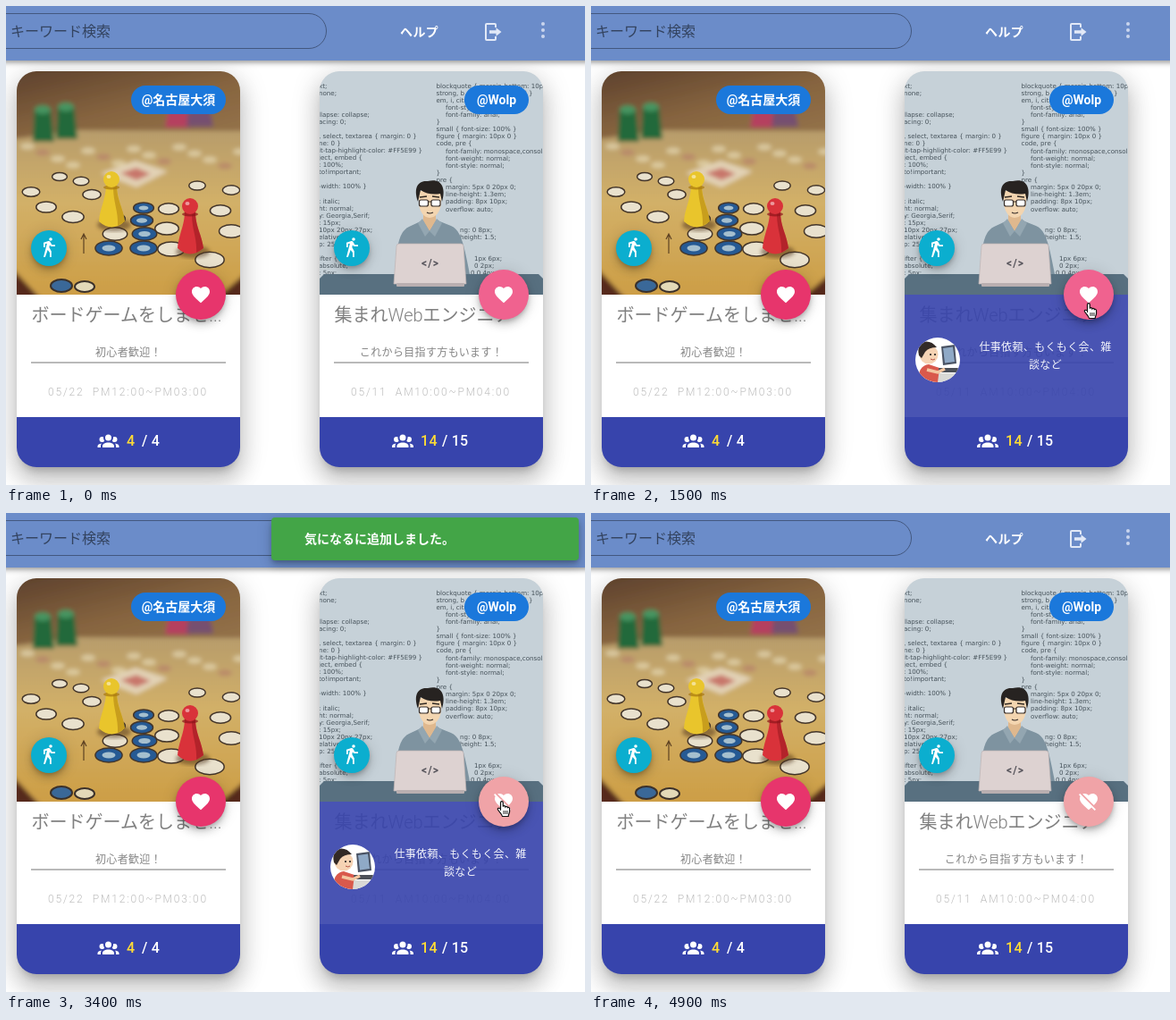
Recreate the animation shown at these times as an HTML page. Size 648x536 px, loop 5 s.

```html
<!DOCTYPE html>
<html lang="ja">
<head>
<meta charset="utf-8">
<title>Event cards</title>
<style>
html, body { margin: 0; width: 100%; height: 100%; overflow: hidden; background: #fff; }
svg { display: block; width: 648px; height: 536px; font-family: Roboto, "Noto Sans CJK JP", "Noto Sans CJK", sans-serif; }
.code { font: 7.1px "DejaVu Sans", sans-serif; fill: #46525a; }
.small { font-size: 12px; letter-spacing: .35px; text-anchor: middle; }
.strong { font-size: 14px; font-weight: 700; fill: #fff; }
</style>
</head>
<body>
<svg id="stage" viewBox="0 0 648 536"></svg>
<script>
const LOOP = 5000, STEP = 100;
const HEART = 'M12 21.35L10.55 20.03C5.4 15.36 2 12.27 2 8.5C2 5.41 4.42 3 7.5 3C9.24 3 10.91 3.81 12 5.08C13.09 3.81 14.76 3 16.5 3C19.58 3 22 5.41 22 8.5C22 12.27 18.6 15.36 13.45 20.03Z';
const HEART_OFF = 'M1 4.27L2.28 3L20 20.72L18.73 22L15.18 18.44L12 21.35L10.55 20.03C5.4 15.36 2 12.27 2 8.5C2 7.55 2.23 6.67 2.63 5.9ZM7.5 3C9.24 3 10.91 3.81 12 5.08C13.09 3.81 14.76 3 16.5 3C19.58 3 22 5.41 22 8.5C22 11.07 20.42 13.32 17.79 15.97L5.27 3.45C5.95 3.16 6.7 3 7.5 3Z';
const WALK = 'M14.12 10H19V8.2H15.38L13.38 4.87C13.08 4.37 12.54 4.03 11.92 4.03L11.42 4.11L6 5.8V11H7.8V7.33L9.91 6.67L6 22H7.8L10.67 13.89L13 17V22H14.8V15.59L12.31 11.05L13.04 8.18ZM14 3.8A1.8 1.8 0 1 0 14 .2A1.8 1.8 0 1 0 14 3.8Z';
const GROUP = 'M12 5.5A3.5 3.5 0 1 1 12 12.5A3.5 3.5 0 1 1 12 5.5ZM5 8C5.56 8 6.08 8.15 6.53 8.42C6.38 9.85 6.8 11.27 7.66 12.38C7.16 13.34 6.16 14 5 14A3 3 0 0 1 5 8ZM19 8A3 3 0 0 1 19 14C17.84 14 16.84 13.34 16.34 12.38C17.2 11.27 17.62 9.85 17.47 8.42C17.92 8.15 18.44 8 19 8ZM5.5 18.25C5.5 16.18 8.41 14.5 12 14.5C15.59 14.5 18.5 16.18 18.5 18.25V20H5.5ZM0 20V18.5C0 17.11 1.89 15.94 4.45 15.6C3.86 16.28 3.5 17.22 3.5 18.25V20ZM24 20H20.5V18.25C20.5 17.22 20.14 16.28 19.55 15.6C22.11 15.94 24 17.11 24 18.5V20Z';

const rect = (x, y, w, h, fill, more = '') => `<rect x="${x}" y="${y}" width="${w}" height="${h}" fill="${fill}" ${more}/>`;
const disc = (x, y, r, fill, more = '') => `<circle cx="${x}" cy="${y}" r="${r}" fill="${fill}" ${more}/>`;
const oval = (x, y, rx, ry, fill, more = '') => `<ellipse cx="${x}" cy="${y}" rx="${rx}" ry="${ry}" fill="${fill}" ${more}/>`;
const path = (d, fill, more = '') => `<path d="${d}" fill="${fill}" ${more}/>`;
const text = (x, y, str, more) => `<text x="${x}" y="${y}" ${more}>${str}</text>`;
const icon = (x, y, d, id = '') => path(d, '#fff', `transform="translate(${x} ${y})" ${id}`);
const group = (inner, more = '') => `<g ${more}>${inner}</g>`;

// each shadow layer: drop, blur, spread, opacity
const LOW = [[2, 4, -1, .2], [4, 5, 0, .14], [1, 10, 0, .12]];
const MID = [[3, 5, -1, .2], [6, 10, 0, .14], [1, 18, 0, .12]];
const HIGH = [[8, 10, -5, .2], [16, 24, 2, .14], [6, 30, 5, .12]];
const raise = (x, y, w, h, r, layers) => layers.map(([drop, blur, s, a]) =>
  rect(x - s, y + drop - s, w + 2 * s, h + 2 * s, '#000', `rx="${r + s}" opacity="${a}" style="filter:blur(${blur / 2}px)"`)).join('');
const raiseDisc = (x, y, r, layers) => raise(x - r, y - r, 2 * r, 2 * r, r, layers);

function pawn(x, y, color, shade) {
  return oval(x + 3, y + 51, 19, 7, '#4a2d12', 'opacity=".5" filter="url(#soft)"') +
    path(`M${x - 6} ${y + 6}C${x - 6} ${y + 22} ${x - 13} ${y + 32} ${x - 14} ${y + 47}Q${x} ${y + 60} ${x + 15} ${y + 47}C${x + 13} ${y + 32} ${x + 6} ${y + 22} ${x + 6} ${y + 6}Z`, color) +
    path(`M${x + 2} ${y + 9}C${x + 2} ${y + 26} ${x + 8} ${y + 36} ${x + 7} ${y + 52}L${x + 15} ${y + 47}C${x + 13} ${y + 32} ${x + 6} ${y + 22} ${x + 6} ${y + 8}Z`, shade, 'opacity=".5"') +
    oval(x, y + 9, 9, 2.5, shade, 'opacity=".7"') + disc(x, y, 9, color) +
    oval(x - 3, y - 3, 2.5, 2, '#fff', 'opacity=".5"');
}

function boardPhoto() {
  const spots = [[75, 236], [96, 211], [60, 191], [84, 196], [45, 225], [28, 208], [122, 255], [185, 272],
    [214, 201], [240, 229], [252, 252], [228, 284], [182, 227], [180, 249], [252, 206]];
  const blues = [[154, 226], [152, 240], [155, 255], [154, 271], [115, 271], [121, 238]];
  const spot = fill => ([x, y]) => {
    const r = 6 + (y - 180) / 12;
    return oval(x, y, r + 1.5, r * .52 + 1, fill, 'stroke="#43352a" stroke-width="1.5"') +
      (fill === '#265a94' ? oval(x, y, r * .55, r * .25, '#a5bfce') : '');
  };
  let far = rect(0, 60, 275, 275, 'url(#wood)') +
    path('M0 150L80 139L280 140V310L216 340H54L0 290Z', 'url(#board)') +
    path('M0 286L50 340H0ZM280 288V340H222Z', '#57291d');
  for (const [x, y] of [[41, 124], [67, 121]])
    far += path(`M${x - 9} ${y - 10}H${x + 9}L${x + 13} ${y + 28}H${x - 11}Z`, '#20693b') + oval(x, y - 8, 9, 5, '#469461');
  far += path('M182 114h20l4 22h-28Z', '#b5405e') + path('M205 110h22l5 25h-30Z', '#76506f');
  for (let i = 0; i < 15; i++)
    far += oval(24 + i * 17, 157 + (i * 7) % 23, 8, 3.5, i % 4 === 1 ? '#b5806a' : '#e3d5b0', 'opacity=".75"');
  far += path('M106 187L145 173L181 185L146 203Z', '#e2d2b5') + path('M128 187L146 181L162 188L146 195Z', '#c8766a');
  return group(far, 'filter="url(#blur)"') +
    group(path('M87 277V256M84 261L87 255L90 261', 'none', 'stroke="#5d4122" stroke-width="1.2"') +
      spots.map(spot('#e9e1cd')).join('') + blues.map(spot('#265a94')).join(''), 'filter="url(#edge)"') +
    group(oval(62, 313, 12, 7, '#3a6898') + oval(88, 314, 11, 6, '#e3d9b8'), 'stroke="#3a302a" stroke-width="2" filter="url(#edge)"') +
    pawn(118, 194, '#e9c52c', '#a8780f') + pawn(206, 224, '#d9323a', '#8d151b');
}

function coder() {
  const left = [[92, 'xt;'], [100, 'none;'], [124, 'llapse: collapse;'], [132, 'acing: 0;'],
    [148, ', select, textarea { margin: 0 }'], [156, 'ne: 0 }'], [164, 'it-tap-highlight-color: #FF5E99 }'],
    [172, 'ject, embed {'], [180, ': 100%;'], [188, 'to!important;'], [204, '-width: 100% }'], [221, ': italic;'],
    [229, 'ht: normal;'], [237, 'y: Georgia,Serif;'], [245, ': 15px;'], [253, ' 10px 20px 27px;'],
    [261, 'elative;'], [269, 'p: 25px;'], [285, 'ifter {'], [293, 'absolute;'], [301, ': 5px;']];
  const right = ['blockquote { margin-bottom: 10px }', 'strong, b { font-weight: bold }', 'em, i, cite {', '>font-style: italic;',
    '>font-family: arial;', '}', 'small { font-size: 100% }', 'figure { margin: 10px 0 }', 'code, pre {',
    '>font-family: monospace,consolas;', '>font-weight: normal;', '>font-style: normal;', '}', 'pre {',
    '>margin: 5px 0 20px 0;', '>line-height: 1.3em;', '>padding: 8px 10px;', '>overflow: auto;'];
  const low = [[508, 253, 'ng: 0 8px;'], [508, 261, 'height: 1.5;'], [524, 285, '1px 6px;'], [524, 293, '0 2px;'], [520, 301, '0 0 4px;']];
  const lines = left.map(([y, s]) => text(350, y, s, '')).join('') +
    right.map((s, i) => text(s[0] === '>' ? 492 : 481.5, 91.5 + i * 8.12, s.replace('>', ''), '')).join('') +
    low.map(l => text(...l, '')).join('');
  return rect(351, 73, 250, 250, '#c6d1d8') + group(lines, 'class="code"') +
    path('M351 305L356 300H596L601 305V323H351Z', '#587080') +
    path('M436 300C437 270 439 253 451 247L466 240H483L498 246C510 251 513 270 519 300Z', '#7e93a0') +
    path('M450 268L453 300M504 268L503 300', 'none', 'stroke="#61798a"') +
    path('M467 230H481V241L474 252L467 241Z', '#dfb88e') +
    path('M466 238L474 252L469 258L461 243ZM482 238L474 252L480 258L488 243Z', '#93a6b1') +
    path('M462 207H487V221Q485 236 474 237Q464 236 462 221Z', '#f3d5b0') +
    path('M461 219C455 201 463 195 472 196C487 192 493 203 488 219L486 210Q473 212 464 206Z', '#272321') +
    path('M463 214L471 213M477 213L485 214', 'none', 'stroke="#302822" stroke-width="1.6"') +
    group(rect(462.5, 217, 10, 7, '#fff', 'rx="2"') + rect(476, 217, 10, 7, '#fff', 'rx="2"') +
      path('M472.5 219H476M471 231Q474 233 478 231', 'none'), 'stroke="#332a27" stroke-width="1.2"') +
    path('M440 266H509Q512 266 512 269L515 311H434L437 269Q437 266 440 266Z', '#ddd2d1', 'stroke="#bdb3b3" stroke-width=".7"') +
    rect(437, 310, 76, 4, '#b9afb0', 'rx="1"') +
    text(475, 292, '&lt;/&gt;', 'font-size="12" font-weight="700" letter-spacing="1" text-anchor="middle" fill="#56545b"');
}

function card(x, o) {
  const body = o.photo + rect(x, 323, 250, 137, '#fff') +
    text(x + 16.5, 353, o.title, 'font-size="20" font-weight="300" fill="#808080"') +
    text(x + 125, 392, o.note, 'class="small" fill="#858585"') +
    rect(x + 16, 398, 218, 2, '#b9b9b9') +
    text(x + 35, 436, o.date, 'font-size="12" font-weight="300" letter-spacing="1.8" fill="#bcbcbc"') +
    (o.extra || '') +
    rect(x, 460, 250, 56, '#3744ac') + icon(o.iconX, 474, GROUP) +
    text(o.countX, 492, o.count, 'font-size="16" font-weight="500" letter-spacing=".4" fill="#ffdc35"') +
    text(o.totalX, 492, '/ ' + o.total, 'font-size="16" font-weight="500" letter-spacing=".2" fill="#fff"');
  return raise(x, 73, 250, 443, 22, HIGH) + group(body, `clip-path="url(#card${x})"`) +
    rect(x + 234 - o.chipW, 89, o.chipW, 32, '#1b78db', 'rx="16"') +
    text(x + 234 - o.chipW / 2, 110, o.place, 'class="strong" text-anchor="middle"') +
    raiseDisc(x + 36, 271, 20, MID) + disc(x + 36, 271, 20, '#0baecf') + icon(x + 24, 259, WALK) +
    raiseDisc(x + 206, 323, 28, MID) + disc(x + 206, 323, 28, o.color, o.fabId || '') +
    icon(x + 194, 311, HEART, o.heartId || '');
}

const avatar = disc(388, 396, 25, '#fff') + group(
  path('M372 411H414V423H372Z', '#d9d9d6') +
  path('M366 421Q366 402 378 401L390 405L388 421Z', '#d9594c') +
  path('M392 381L407 379L409 400L394 402Z', '#4a5364') + path('M394 383L405 381.5L407 398L396 399.5Z', '#8fa9c6') +
  rect(389, 405, 22, 5, '#4c5058', 'rx="1"') + disc(378, 390, 10.5, '#f6d3b4') +
  path('M367 391C363 374 379 371 387 382Q378 382 374 387L370 394Z', '#332a27') +
  disc(380, 390, 1.1, '#222') + disc(385, 390, 1.1, '#222') + path('M380 395Q383 397 385 395', 'none', 'stroke="#b85748"') +
  path('M376 407L388 410L396 406', 'none', 'stroke="#f3c6a0" stroke-width="3.5"'), 'clip-path="url(#face)"');

const reveal = group(rect(351, 323, 250, 137, '#3744ac', 'opacity=".91"') +
  group(avatar + text(508.5, 386, '仕事依頼、もくもく会、雑', 'class="small" fill="#f3f4fb"') +
    text(508.5, 406, '談など', 'class="small" fill="#f3f4fb"'), 'id="info"'), 'id="reveal" clip-path="url(#open)"');

const defs = `<defs>
<linearGradient id="wood" x1="0" y1="0" x2=".25" y2="1"><stop stop-color="#553a29"/><stop offset=".3" stop-color="#86643f"/><stop offset="1" stop-color="#b59361"/></linearGradient>
<linearGradient id="board" x1="0" y1="0" x2="0" y2="1"><stop stop-color="#b79c6c"/><stop offset=".4" stop-color="#d2b068"/><stop offset="1" stop-color="#cc9b40"/></linearGradient>
<filter id="blur"><feGaussianBlur stdDeviation="2.6"/></filter>
<filter id="soft"><feGaussianBlur stdDeviation="2"/></filter>
<filter id="edge"><feGaussianBlur stdDeviation=".6"/></filter>
<clipPath id="card12">${rect(12, 73, 250, 443, '#000', 'rx="22"')}</clipPath>
<clipPath id="card351">${rect(351, 73, 250, 443, '#000', 'rx="22"')}</clipPath>
<clipPath id="face">${disc(388, 396, 25, '#000')}</clipPath>
<clipPath id="open">${rect(351, 323, 250, 137, '#000', 'id="slot"')}</clipPath>
</defs>`;

const header = raise(-20, 0, 688, 61, 2, LOW) + rect(0, 0, 648, 61, '#6b8cc9') +
  rect(-40, 8.5, 398.5, 39, 'none', 'rx="19.5" stroke="#43587f"') +
  text(5, 34, 'キーワード検索', 'font-size="16" fill="#33435f"') +
  text(441, 34, 'ヘルプ', 'class="strong" letter-spacing=".4"') +
  path('M548 24V21Q548 20 547 20H538Q537 20 537 21V37Q537 38 538 38H547Q548 38 548 37V34', 'none', 'stroke="#e2e9f7" stroke-width="2"') +
  path('M541 27.3H548.5V24.2L554.5 29L548.5 33.8V30.7H541Z', '#e2e9f7') +
  [20, 27, 34].map(y => disc(601, y, 2, '#c9d5ed')).join('');

const snack = group(raise(297, 5, 344, 48, 4, MID) + rect(297, 5, 344, 48, '#43a547', 'rx="4"') +
  text(334, 34, '気になるに追加しました。', 'class="strong"'), 'id="snack"');

const hand = path('M4.5 9V2.2C4.5 .2 7.3 .2 7.3 2.2V6.5C7.6 5.3 9.7 5.4 9.9 6.9C10.5 6 12.2 6.2 12.4 7.6C13.2 7 14.6 7.4 14.6 8.8V12C14.6 14 13.2 15 13.2 17.5H6.5C6 15 3.5 13 1.5 10C.6 8.4 2.8 7.6 4.5 9Z', '#fff', 'stroke="#111" stroke-width="1.2"') +
  path('M8 11V15M10 11V15M12 11V15M4.5 9V11', 'none', 'stroke="#111" stroke-width=".9"');
const arrow = path('M0 0V14.5L3.3 11.4L5.9 17L8.5 15.8L6 10.3H10.2Z', '#111', 'stroke="#fff" stroke-width="1.1"');

const stage = document.getElementById('stage');
stage.innerHTML = defs + rect(0, 0, 648, 536, '#fff') +
  card(12, { photo: boardPhoto(), title: 'ボードゲームをしませ...', note: '初心者歓迎！', date: '05/22\u00a0\u00a0PM12:00~PM03:00',
    iconX: 102.5, countX: 135, count: 4, totalX: 152, total: 4, place: '@名古屋大須', chipW: 106, color: '#e7356c' }) +
  card(351, { photo: coder(), title: '集まれWebエンジニア', note: 'これから目指す方もいます！', date: '05/11\u00a0\u00a0AM10:00~PM04:00',
    iconX: 432, countX: 464, count: 14, totalX: 488, total: 15, place: '@Wolp', chipW: 72, color: '#f0628f',
    extra: reveal, fabId: 'id="fab"', heartId: 'id="heart"' }) +
  disc(557, 323, 0, '#fff', 'id="ripple"') + header + snack +
  group(group(hand, 'id="hand"') + group(arrow, 'id="arrow"'), 'id="cursor"');

const el = id => document.getElementById(id);
const set = (id, attrs) => { for (const k in attrs) el(id).setAttribute(k, attrs[k]); };
const part = (t, a, b) => Math.min(1, Math.max(0, (t - a) / (b - a)));
const ease = p => p * p * (3 - 2 * p);
const show = on => on ? 'inline' : 'none';

// time, x, y of the pointer tip
const track = [[1300, 562, 478], [1400, 560, 385], [1500, 557, 332], [1800, 557, 332], [2100, 555, 322],
  [3700, 555, 322], [3900, 556, 366], [4000, 556, 377], [4100, 557, 484]];

function pointer(t) {
  let i = 0;
  while (i < track.length - 2 && t >= track[i + 1][0]) i++;
  const [a, b] = [track[i], track[i + 1]], p = part(t, a[0], b[0]);
  return [a[1] + (b[1] - a[1]) * p, a[2] + (b[2] - a[2]) * p];
}

function render(t) {
  const open = ease(part(t, 1200, 1500)) - ease(part(t, 4150, 4450)), h = 137 * open;
  set('reveal', { display: show(open > 0) });
  set('slot', { y: 460 - h, height: h });
  set('info', { transform: `translate(0 ${(137 - h) / 2})` });

  const saved = t >= 2400;
  set('fab', { fill: saved ? '#f0a3a7' : '#f0628f' });
  set('heart', { d: saved ? HEART_OFF : HEART });
  set('ripple', { r: 28 * part(t, 2180, 2330), opacity: .25 * (1 - part(t, 2300, 2600)) });

  const pop = ease(part(t, 2330, 2500)), scale = .8 + .2 * pop;
  set('snack', { opacity: pop * (1 - part(t, 3450, 3600)),
    transform: `translate(469 29) scale(${scale}) translate(-469 -29)` });

  const [x, y] = pointer(t), overFab = Math.hypot(x - 557, y - 323) < 28;
  set('cursor', { display: show(t >= 1300 && t < 4200), transform: `translate(${x - (overFab ? 6 : 0)} ${y})` });
  set('hand', { display: show(overFab) });
  set('arrow', { display: show(!overFab) });
}

const start = performance.now();
function tick() {
  const t = (performance.now() - start) % LOOP;
  render(Math.floor(t / STEP) * STEP);
  requestAnimationFrame(tick);
}
tick();
</script>
</body>
</html>
```
